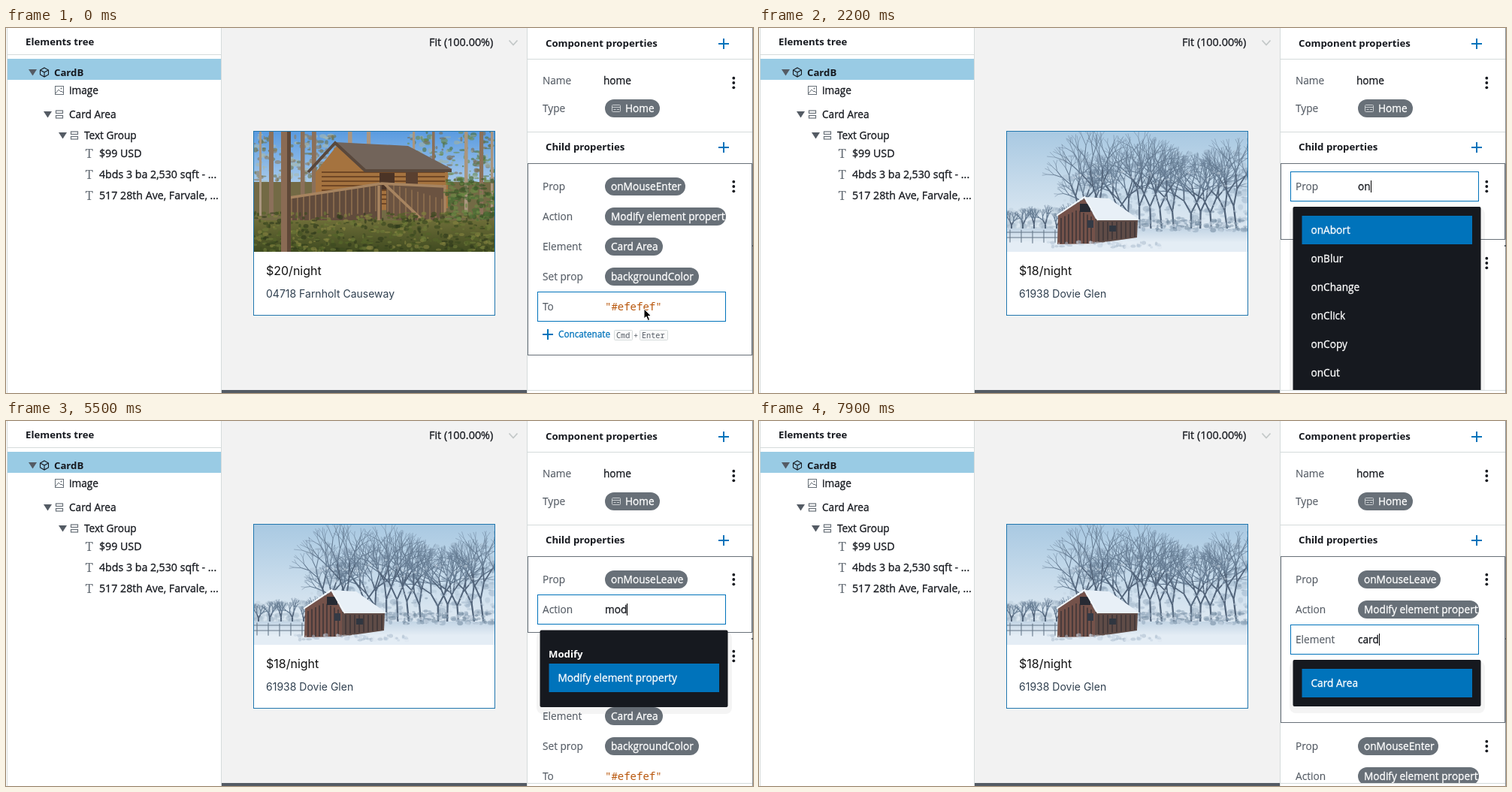
An HTML page that plays this animation: 994x486 px, repeating every 8000 ms.

```html
<!DOCTYPE html>
<html lang="en">
<head>
<meta charset="utf-8">
<title>Component editor</title>
<style>
  html, body { margin: 0; width: 100%; height: 100%; overflow: hidden; background: #fff; }
  svg { display: block; width: 994px; height: 486px; }
  text { --ink: #16191f; font: 13.65px "Open Sans", "Noto Sans", sans-serif; fill: var(--ink); stroke: var(--ink); stroke-width: .3px; white-space: pre; }
  .b { font-size: 13.2px; font-weight: 700; stroke: none; }
  .num { font-size: 14.2px; }
  .label { --ink: #545b64; stroke-width: .15px; }
  .undef { --ink: #687078; font-size: 14px; font-style: italic; stroke-width: .15px; }
  .w { --ink: #fff; }
  .code { --ink: #b8560b; font: 14px "Noto Sans Mono", "DejaVu Sans Mono", monospace; stroke: none; }
  .key { --ink: #545b64; font: 10.2px "Noto Sans Mono", "DejaVu Sans Mono", monospace; stroke: none; }
  .link { --ink: #0073bb; font-size: 11.75px; }
  .card { --ink: #111; font: 16px Inter, sans-serif; stroke: none; }
  .addr { --ink: #304050; font: 14px Inter, sans-serif; stroke: none; }
  .serif { --ink: #687078; font: 17px "Noto Serif", serif; stroke: none; }
</style>
</head>
<body>
<svg id="stage" viewBox="0 0 994 486">
  <defs>
    <clipPath id="panelClip"><rect x="694" y="180" width="300" height="302"/></clipPath>
    <clipPath id="valueClip"><rect x="700" y="0" width="257" height="486"/></clipPath>
    <clipPath id="photoClip"><rect x="330" y="138" width="320" height="160"/></clipPath>
    <linearGradient id="blueSky" x2="0" y2="1"><stop stop-color="#5a9be0"/><stop offset=".5" stop-color="#b5d2ec"/></linearGradient>
    <linearGradient id="snowSky" x2="0" y2="1"><stop stop-color="#a9c9e2"/><stop offset=".75" stop-color="#dbe7f1"/></linearGradient>
    <linearGradient id="snow" x2="0" y2="1"><stop stop-color="#c3d5e5"/><stop offset=".6" stop-color="#e4edf5"/></linearGradient>
    <linearGradient id="bush" x2="0" y2="1"><stop stop-color="#6d6d38"/><stop offset="1" stop-color="#3f4a20"/></linearGradient>
  </defs>
  <g id="base"></g>
  <g id="live"></g>
</svg>
<script>
const LOOP = 8000, STEP = 100;
const BLUE = '#0073bb', GREY = '#687078', LINE = '#d5dbdb';
const $ = id => document.getElementById(id);

const text = (x, mid, s, cls = '', extra = '') =>
  `<text x="${x}" y="${mid + 5}" class="${cls}" ${extra}>${s}</text>`;
const rect = (x, y, w, h, fill, extra = '') =>
  `<rect x="${x}" y="${y}" width="${w}" height="${h}" fill="${fill}" ${extra}/>`;
const frame = (x, y, w, h, color) => rect(x + .5, y + .5, w, h, 'none', `stroke="${color}"`);
const path = (d, stroke, width = 1, fill = 'none') =>
  `<path d="${d}" fill="${fill}" stroke="${stroke}" stroke-width="${width}"/>`;
const poly = (points, fill) => `<polygon points="${points}" fill="${fill}"/>`;
const plus = (x, y, r = 7) => path(`M${x - r} ${y}h${2 * r}M${x} ${y - r}v${2 * r}`, BLUE, 2);
const dots = (x, y) => [-6.3, 0, 6.3].map(d => `<circle cx="${x + .3}" cy="${y + d}" r="1.9" fill="#16191f"/>`).join('');
const pill = (y, w, s, x = 805) =>
  rect(797, y - 12, w, 24, GREY, 'rx="12"') + text(x, y, s, 'w', 'clip-path="url(#valueClip)"');

function random(seed) {
  return () => (seed = (seed * 16807) % 2147483647) / 2147483647;
}

// Soft blobs scattered over a box
function blobs(seed, n, x, y, w, h, colors, opacity, size = 1) {
  const r = random(seed);
  let out = '';
  for (let i = 0; i < n; i++) {
    out += `<ellipse cx="${(x + r() * w).toFixed(1)}" cy="${(y + r() * h).toFixed(1)}" rx="${(size * (2 + r() * 6)).toFixed(1)}" ry="${(size * (1.5 + r() * 4)).toFixed(1)}" fill="${colors[i % colors.length]}" opacity="${opacity}"/>`;
  }
  return out;
}

function cabinPhoto() {
  const r = random(41);
  let trunks = '';
  for (const x of [337, 350, 392, 407, 455, 480, 541, 567, 610, 630, 645])
    trunks += rect(x, 138, 3 + r() * 3, 112, r() > .5 ? '#8b705a' : '#ab967f');
  let logs = '', posts = '';
  for (let y = 192; y < 236; y += 6) logs += `M420 ${y}H584`;
  for (let x = 372; x < 500; x += 8) posts += `M${x} ${228 - (x - 372) * .15}v34`;
  for (let x = 508; x < 584; x += 8) posts += `M${x} ${206 + (x - 508) * .3}v42`;
  return rect(330, 138, 320, 160, 'url(#blueSky)')
    + blobs(7, 260, 330, 142, 110, 90, ['#6d7148', '#8b7a5e', '#a9b9ad'], .6, .6)
    + blobs(17, 300, 535, 138, 115, 110, ['#50703b', '#7a6a4e', '#6d8a4c', '#9fb0a4'], .6, .6)
    + rect(330, 205, 320, 60, '#736a45')
    + trunks
    + poly('412,192 440,157 478,188 588,184 588,240 412,245', '#a5733f')
    + path(logs, '#704725', 1.8)
    + rect(497, 193, 20, 22, '#4b3426') + rect(532, 192, 16, 17, '#5a4030')
    + poly('438,152 535,157 594,188 476,188', '#72645a')
    + path('M402 192L438 153L478 190H593', '#59483c', 4)
    + poly('372,226 500,208 500,254 372,270', '#614b3c')
    + poly('506,206 584,212 584,244 560,272 506,250', '#6b5341')
    + path(posts, '#90704f', 1.6)
    + path('M370 227L500 207L584 211M503 207L566 267M496 210L496 262M584 209V250', '#a78460', 3.5)
    + rect(330, 256, 320, 42, 'url(#bush)')
    + blobs(29, 620, 330, 246, 320, 52, ['#6c7838', '#3c4a20', '#82813f', '#54642a', '#2f3a1b'], .65, .55)
    + blobs(33, 160, 586, 200, 64, 55, ['#4d6d36', '#6b8844', '#3c5528'], .7, .6)
    + rect(366, 138, 13, 160, '#8a6b54') + rect(374, 138, 5, 160, '#5f4838');
}

function winterPhoto() {
  const r = random(97), levels = Array(7).fill('');
  function branch(x, y, angle, len, depth) {
    const nx = x + Math.cos(angle) * len, ny = y + Math.sin(angle) * len;
    levels[depth] += `M${x.toFixed(1)} ${y.toFixed(1)}L${nx.toFixed(1)} ${ny.toFixed(1)}`;
    if (!depth) return;
    branch(nx, ny, angle - .08 - r() * .45, len * (.72 + r() * .18), depth - 1);
    branch(nx, ny, angle + .08 + r() * .45, len * (.72 + r() * .18), depth - 1);
  }
  for (let x = 424; x < 650; x += 16)
    branch(x + r() * 8, 268, -Math.PI / 2 + (r() - .5) * .3, 21 + r() * 11, 6);
  for (let x = 336; x < 420; x += 15) branch(x, 270, -Math.PI / 2, 6 + r() * 5, 5);
  let posts = '', planks = '';
  for (let x = 334; x < 398; x += 15) posts += `M${x} ${268 + r() * 2}v17`;
  for (let x = 402; x < 446; x += 5) planks += `M${x} ${253 - Math.min(x - 402, 446 - x) * .5}V287`;
  for (let x = 452; x < 502; x += 6) planks += `M${x} 258v${26 - (x - 452) * .12}`;
  return rect(330, 138, 320, 160, 'url(#snowSky)')
    + blobs(11, 330, 405, 165, 245, 103, ['#8199b0', '#a9bed0', '#94abc0'], .4, .8)
    + blobs(13, 120, 330, 240, 100, 28, ['#9fb4c5', '#bacbd9'], .5, .7)
    + levels.map((d, i) => path(d, i > 3 ? '#52647a' : '#667c93', .45 + i * .3)).join('')
    + blobs(37, 220, 405, 185, 245, 80, ['#c3d3e1', '#d4e0ea', '#6f859b'], .4, .4)
    + rect(330, 267, 320, 31, 'url(#snow)')
    + blobs(19, 140, 500, 256, 150, 14, ['#cfdde9', '#92a8bc', '#70869c'], .55, .6)
    + path(posts + 'M330 272H398M330 279H398', '#66788a', 1.1)
    + poly('397,288 398,249 433,227 449,256 449,287', '#74524a')
    + poly('447,254 504,256 503,279 447,287', '#5f4c47')
    + path(planks, '#3f3638', 1.6)
    + poly('427,234 441,234 441,245 427,245', '#262a33')
    + rect(437, 256, 8, 10, '#343a45') + rect(466, 263, 9, 8, '#303640')
    + poly('433,225 466,227 507,256 451,256', '#e8f0f7')
    + path('M396 250L433 225L451 256', '#f3f7fb', 2)
    + blobs(23, 60, 385, 285, 150, 7, ['#bfd0df', '#dbe6ef', '#a5b8c9'], .5, .5);
}

function treeIcons() {
  const caret = (x, y) => poly(`${x},${y - 4} ${x + 11},${y - 4} ${x + 5.5},${y + 4.5}`, '#545b64');
  const stack = (x, y) => [-5, 1.5].map(d => rect(x + .5, y + d, 9, 3.5, 'none', `stroke="${GREY}" stroke-width="1.2"`)).join('');
  return caret(30, 59) + caret(50, 115) + caret(70, 143) + stack(66, 115) + stack(86, 143)
    + path('M51 53L56.500 56V62L51 65L45.500 62V56ZM45.500 56L51 59L56.500 56M51 59V65', '#16191f', 1.1)
    + rect(65.5, 77.5, 11, 11, 'none', `stroke="${GREY}"`) + path('M66 87L70 82L73 85L74 84L77 87', GREY)
    + `<circle cx="73.500" cy="80.500" r="1" fill="${GREY}"/>`
    + [167, 195, 223].map(y => text(105.5, y + 1, 'T', 'serif')).join('');
}

function drawBase() {
  return rect(0, 0, 994, 486, '#fff')
    + rect(287, 0, 406, 486, '#f2f2f2') + rect(287, 482, 406, 4, '#545b64')
    + rect(1, 0, 1, 486, LINE) + rect(286, 0, 1, 486, LINE) + rect(693, 0, 1, 486, LINE) + rect(993, 0, 1, 486, '#8a9094')
    + rect(992, 289, 2, 2, '#545b64')
    + rect(2, 35, 284, 1, LINE) + rect(2, 41, 284, 28, '#99cbe4')
    + text(26, 18, 'Elements tree', 'b') + treeIcons()
    + text(64, 58.5, 'CardB', 'b') + text(84, 83, 'image') + text(84, 115, 'Card Area') + text(104, 143, 'Text Group')
    + text(124, 167, '$99 USD', 'num') + text(124, 195, '4bds 3 ba 2,530 sqft - ...', 'num')
    + text(124, 223, '517 28th Ave, Farvale, ...', 'num')
    + text(563, 19, 'Fit (100.00%)', '', 'style="font-size:14.4px"') + path('M669.500 16.500l5.500 6l5.500 -6', '#c3c8c8', 1.8)
    + [41, 138, 180, 482].map(y => rect(694, y, 299, 1, LINE)).join('')
    + text(718, 20, 'Component properties', 'b') + plus(955, 21)
    + text(714, 70, 'Name', 'label') + text(795, 70, 'home') + dots(968, 73)
    + text(714, 107, 'Type', 'label') + pill(107, 73, 'Home', 824)
    + rect(806.5, 102.5, 11, 9, 'none', 'stroke="#c9cdd0" rx="1"') + path('M807 105.500h10M808.500 108.500h3M813 108.500h3', '#c9cdd0')
    + text(718, 158, 'Child properties', 'b') + plus(955, 159)
    + rect(329.5, 137.5, 321, 245, '#fff', 'stroke="#2176ae"')
    + ['cabin', 'winter'].map(id => `<g id="${id}" clip-path="url(#photoClip)"></g>`).join('');
}

// Value of the last key at or before t
const at = (keys, t) => keys.reduce((v, k) => t >= k[0] ? k[1] : v, '');

const propTyped = [[2100, 'o'], [2200, 'on'], [2500, 'onmo'], [2600, 'onmou'], [2800, 'onmous'],
  [2900, 'onmouse'], [3300, 'onmousel'], [3400, 'onmousele'], [3600, 'onmouseleav']];
const actionTyped = [[5100, 'm'], [5300, 'mo'], [5500, 'mod']];
const elementTyped = [[7700, 'c'], [7800, 'ca'], [7900, 'card']];
const propLists = [
  [0, ['about', 'accessKey', 'alignContent', 'alignItems', 'alignSelf', 'area']],
  [2100, ['onAbort', 'onBlur', 'onChange', 'onClick', 'onCopy', 'onCut']],
  [2500, ['Down', 'Enter', 'Leave', 'Move', 'Out', 'Over'].map(s => 'onMouse' + s)]];

// Moments when the state of the form changes
const ADD = 1100, ADD_MENU = 1300, PICK_PROP = 3900, EDIT_ACTION = 4700, ACTION_MENU = 4800,
  PICK_ACTION = 5800, EDIT_ELEMENT = 7300, ELEMENT_MENU = 7400;

// [start, end, path of [time, x, y]]
const moves = [
  [0, 2000, [[0, 849, 374], [100, 862, 330], [200, 905, 232], [300, 945, 174], [400, 945, 174],
    [600, 970, 168], [900, 953, 157], [1500, 953, 157], [2000, 878, 218]]],
  [4200, 5000, [[4100, 878, 218], [4400, 852, 246], [4600, 846, 252], [4700, 845, 254]]],
  [6100, 7600, [[6000, 846, 256], [6400, 815, 313], [6500, 813, 313], [6700, 817, 297], [7000, 817, 297], [7200, 820, 293]]]];

function pointer(t) {
  const move = moves.find(m => t >= m[0] && t <= m[1]);
  if (!move) return '';
  const keys = move[2];
  const i = keys.findIndex(k => k[0] > t);
  let [, x, y] = keys[keys.length - 1];
  if (i > 0) {
    const a = keys[i - 1], b = keys[i], p = (t - a[0]) / (b[0] - a[0]);
    x = a[1] + (b[1] - a[1]) * p;
    y = a[2] + (b[2] - a[2]) * p;
  }
  const hand = x > 944 && x < 966 && y < 168;
  const shape = hand
    ? 'M-2 0C-2 -2 1 -2 1 0V5C2 4 4 4 4.500 5.500C6 5 7.500 6 7.500 7C9 7 9 8 9 9V12C9 14 7 15 7 16H-2C-2 14 -6 11 -6.500 9C-6.500 7 -4 7.500 -2 10Z'
    : 'M0 0V13L3 10.300L5.200 15.500L7.600 14.500L5.400 9.500H9.500Z';
  return `<g transform="translate(${x} ${y})">${path(shape, hand ? '#111' : '#fff', 1, hand ? '#fff' : '#000')}`
    + (hand ? path('M1 5V9M4.500 6V9M7.500 7.500V9.500', '#111') : '') + '</g>';
}

const label = (y, s) => text(714, y, s, 'label');
const undef = y => text(797, y, 'undefined', 'undef');
const box = (y, color) => frame(707, y - 20, 250, 39, color);
const input = (y, name, s) => rect(708, y - 19, 249, 38, '#fff') + box(y, BLUE) + label(y, name)
  + (s ? text(797, y, s, '', 'id="typed"') : undef(y))
  + rect(797, y - 8, 1, 16, '#000', 'id="caret"');

function dropdown(top, items, head = '', full = false) {
  const first = top + (head ? 44.5 : 12);
  const h = full ? 260 : first - top + items.length * 38 + (head ? 20 : 12);
  return rect(706, top + 2, 260, h + 7, '#000', 'opacity=".045" rx="8"')
    + rect(710.5, top, 250, h, '#16191f', 'rx="2"')
    + (head ? text(722, top + 31, head, 'b w') : '')
    + rect(722.5, first, 226.5, 38, BLUE)
    + items.map((s, i) => text(734.5, first + 19 + i * 38, s, 'w')).join('');
}

function enterSection(dy) {
  return label(211 + dy, 'Prop') + pill(211 + dy, 107, 'onMouseEnter') + dots(968, 211 + dy)
    + label(251 + dy, 'Action') + pill(251 + dy, 161, 'Modify element property')
    + label(291 + dy, 'Element') + pill(291 + dy, 77, 'Card Area')
    + label(331 + dy, 'Set prop') + pill(331 + dy, 125, 'backgroundColor')
    + label(371 + dy, 'To') + text(797, 371 + dy, '"#efefef"', 'code');
}

function concatenate() {
  const key = (x, w, s) => rect(x + .5, 402.5, w, 13, '#fafafa', `stroke="${LINE}" rx="1"`) + text(x + 3, 407.5, s, 'key');
  return box(371, BLUE) + plus(721, 408) + text(735, 407, 'Concatenate', 'link')
    + key(809, 24, 'Cmd') + text(835, 407.5, '+', 'key') + key(843, 37, 'Enter');
}

function propRow(t) {
  if (t >= PICK_PROP)
    return label(211, 'Prop') + pill(211, 110, 'onMouseLeave') + (t < 4400 ? box(211, BLUE) : '');
  const typed = at(propTyped, t);
  let menu = '';
  if (t >= 3300) menu = dropdown(238, ['onMouseLeave', `Create "${typed}"`]);
  else if (t >= ADD_MENU) menu = dropdown(238, at(propLists, t), '', true);
  return input(211, 'Prop', typed) + menu;
}

function actionRow(t) {
  if (t < EDIT_ACTION) return label(251, 'Action') + undef(251) + (t >= 4400 ? box(251, GREY) : '');
  if (t >= PICK_ACTION) return label(251, 'Action') + pill(251, 161, 'Modify element property');
  let menu = '';
  if (t >= 5100) menu = dropdown(278.5, ['Modify element property'], 'Modify');
  else if (t >= ACTION_MENU) menu = dropdown(278.5, ['Go to URL', 'Go to anchor', 'Go to page', 'Reload'], 'Navigate', true);
  return input(251, 'Action', at(actionTyped, t)) + menu;
}

function elementRows(t) {
  if (t < PICK_ACTION) return '';
  const rest = label(331, 'Set prop') + undef(331) + label(371, 'To') + undef(371);
  if (t < EDIT_ELEMENT)
    return rest + label(291, 'Element') + undef(291) + (t >= 6200 ? box(291, GREY) : '') + (t < 7200 ? box(251, BLUE) : '');
  let menu = '';
  if (t >= 7700) menu = dropdown(318, ['Card Area']);
  else if (t >= ELEMENT_MENU) menu = dropdown(318, ['image', 'Card Area', 'Text Group', '$99 USD'], '', true);
  return rest + input(291, 'Element', at(elementTyped, t)) + menu;
}

function draw(t) {
  const added = t >= ADD, tall = t >= PICK_ACTION;
  $('cabin').style.display = added ? 'none' : '';
  $('winter').style.display = added ? '' : 'none';
  const panel = added
    ? enterSection(tall ? 222 : 102) + (t >= 1700 ? frame(694, 180, 298, tall ? 221 : 101, GREY) : '')
      + dots(968, 211) + actionRow(t) + propRow(t) + elementRows(t)
    : enterSection(0) + concatenate() + (t < 300 ? frame(694, 180, 298, 255, GREY) : '');
  $('live').innerHTML = text(346, 324, added ? '$18/night' : '$20/night', 'card')
    + text(346, 354, added ? '61938 Dovie Glen' : '04718 Farnholt Causeway', 'addr')
    + `<g clip-path="url(#panelClip)">${panel}</g>` + pointer(t);
  const typed = $('typed');
  if (typed) $('caret').setAttribute('x', Math.round(797 + typed.getComputedTextLength()));
}

$('base').innerHTML = drawBase();
$('cabin').innerHTML = cabinPhoto();
$('winter').innerHTML = winterPhoto();

const start = performance.now();
let shown = -1;
function tick() {
  const t = Math.floor((performance.now() - start) % LOOP / STEP) * STEP;
  if (t !== shown) draw(shown = t);
  requestAnimationFrame(tick);
}
tick();
</script>
</body>
</html>
```
